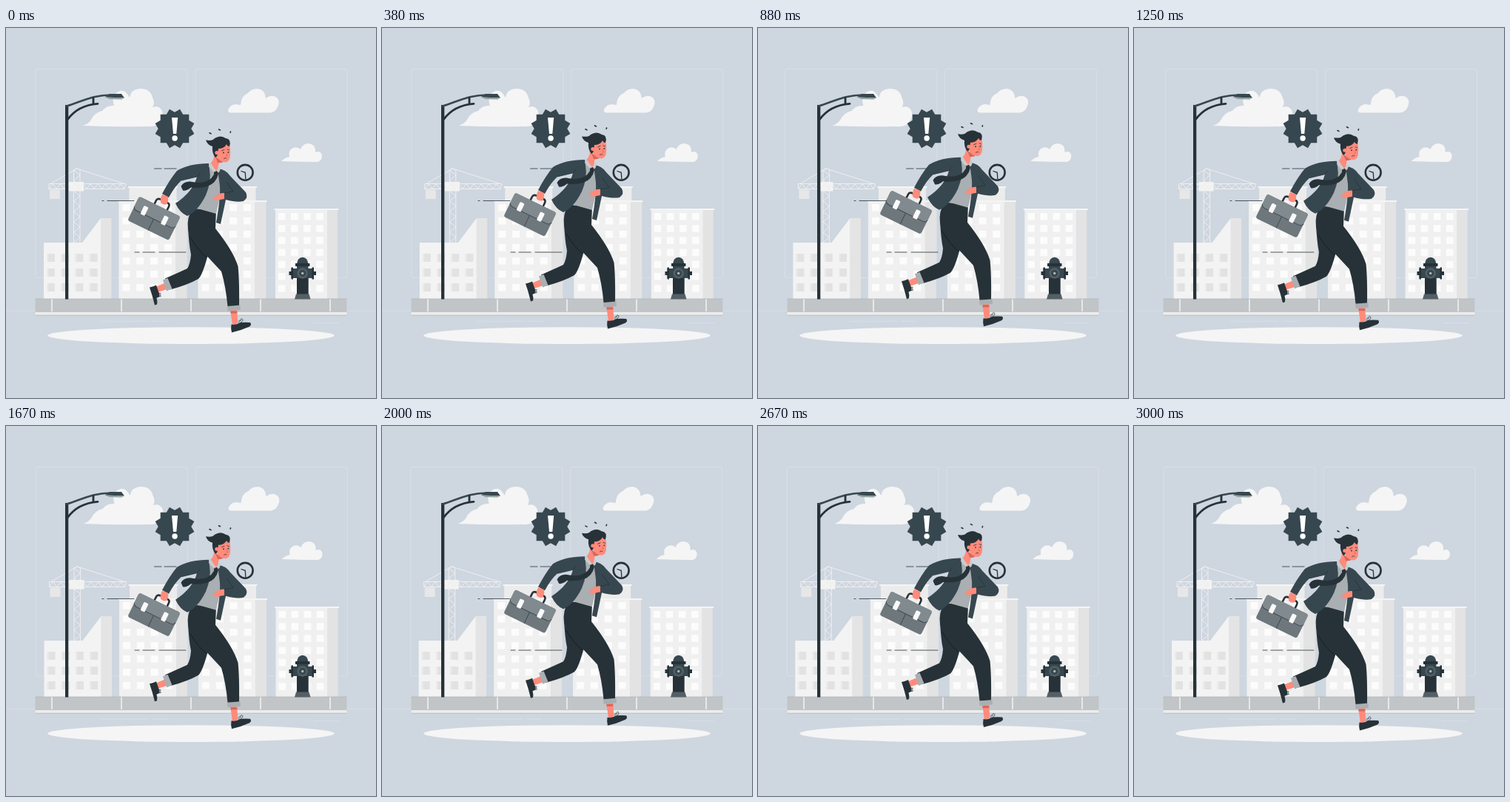
These frames come from a looping animation (500 px wide and 500 px high, 3.04 s). An HTML page:

```html
<!DOCTYPE html>
<html lang="en">
<head>
<meta charset="utf-8">
<title>Running late</title>
<style>
  html, body { margin: 0; width: 100%; height: 100%; overflow: hidden; background: #ced6e0; }
  svg { display: block; width: 100%; height: 100%; }
  .dark { fill: #263238; }
  .coat { fill: #37474f; }
  .skin { fill: #ff8b7b; }
  .shirt { fill: #a9afb2; }
  .pale { fill: #f5f5f5; }
  .line { fill: none; stroke: #263238; stroke-linecap: round; }
</style>
</head>
<body>
<svg viewBox="0 0 500 500">
  <g id="city">
    <g fill="none" stroke="#dbe1e8" stroke-width=".8">
      <rect x="40" y="55.5" width="205" height="282" rx="3"/>
      <rect x="256" y="55.5" width="205" height="282" rx="3"/>
      <path d="M0 382.3H500M127 396.3H192M197 396.3H218M415 398.5H450"/>
    </g>
    <g class="pale">
      <path d="M104 132Q112 129 115 124Q120 114 130 112Q136 104 146 105Q142 92 150 87Q160 80 167 94Q169 83 180 82Q195 81 198 94Q202 101 198 107Q207 104 211 112Q214 121 207 128Q204 134 190 133Q145 134 104 132Z"/>
      <path d="M300 111Q303 103 311 103Q315 104 317 104Q318 91 327 88Q331 82 340 82Q350 83 351 95Q359 89 366 94Q371 99 367 107Q364 114 357 114.5H305Q300 115 300 111Z"/>
      <path d="M372 180Q377 175 383 174Q381 165 388 162Q394 160 398 164Q401 156 409 156Q419 157 418 168Q425 165 427 172Q427 180 421 181Q398 181 372 180Z"/>
    </g>
    <g id="crane" fill="none" stroke="#efefef" stroke-width="1">
      <path d="M91.5 192V290M100 192V290M58 210.5H162M58 217.5H160M162 210.5L160 217.5M58 210.5V218M95.5 190L60 210.5M95.5 190L160 210.5M91.5 192L95.5 189.5L100 192"/>
      <rect x="59" y="218.5" width="14" height="12.5" fill="#e7e7e7" stroke="none"/>
      <rect x="85" y="208" width="20" height="12.5" fill="#f3f3f3" stroke="none"/>
    </g>
    <path fill="#e4e4e4" d="M128 257H142.5V366H128Z"/>
    <path fill="#f3f3f3" d="M51 290H103L128 257V366H51Z"/>
    <g id="houses"></g>
  </g>

  <path fill="#c2c5c7" d="M39.5 366H460.5V384H39.5Z"/>
  <path fill="#ececec" d="M39.5 384H460.5V388H39.5Z"/>
  <path d="M39.5 366H460.5M39.5 388.2H460.5" stroke="#aeb3b6" stroke-width=".7"/>
  <path d="M62 366.5V383M156 366.5V383M250 366.5V383M344 366.5V383M438 366.5V383" stroke="#ececec" stroke-width="1.8"/>
  <ellipse class="pale" cx="250" cy="415.6" rx="194" ry="11.4"/>

  <!-- street lamp -->
  <path class="dark" d="M80 104H84.3V366.5H80Z"/>
  <path class="line" style="stroke:#37474f" d="M82 105.5C101 100 117 89.5 146 90.5" stroke-width="2.6"/>
  <path class="line" d="M83 124C90 114 102 104 124 102.3M118 94.5V102" stroke-width="2.8"/>
  <path class="coat" d="M134 93.5L140 89H156L160 94.5Z"/>
  <path fill="#90a09f" d="M134 93.5L160 94.5L156 96.5L140 96Z"/>

  <!-- hydrant -->
  <path class="coat" d="M393 319Q394 310 400.7 309.7Q407.5 310 408.5 319V360H393Z"/>
  <path class="dark" d="M393 338H408.5V360H393ZM391 318H410.5V322H391Z"/>
  <path class="coat" d="M385.5 325H416V338H385.5Z"/>
  <path class="dark" d="M385.5 323.5H388V339.5H385.5ZM413.5 323.5H416V339.5H413.5ZM382.5 329H385.5V334H382.5ZM416 329H419V334H416Z"/>
  <circle cx="400.7" cy="331.5" r="7.2" fill="#546066"/>
  <circle class="coat" cx="400.7" cy="331.5" r="4.7"/>
  <circle cx="400.7" cy="331.5" r="1.7" fill="#aeb7bb"/>
  <path fill="#546066" d="M392 359.5H409.5L411.5 366.5H390Z"/>

  <polygon id="badge" class="coat"/>
  <path fill="#fff" d="M224 121H232.2L230.3 143H226Z"/>
  <circle fill="#fff" cx="228.1" cy="149" r="3.7"/>

  <circle class="line" cx="323.2" cy="195.3" r="10.4" stroke-width="2.6"/>
  <path class="line" d="M318 193.5L323.3 195.3L323.8 204" stroke-width="1.3"/>

  <path class="line" stroke-width=".8" d="M200.5 190H210M214 190H230M130 233.5H132M137 233.5H173M174 303H180M185 303H201M207 303H243"/>

  <g id="man">
    <path class="line" stroke-width="1.6" d="M275 141.8L277 142.8M287.5 137L289.5 138M303.5 140L303.2 141.3"/>

    <!-- rear leg -->
    <path class="skin" d="M203 349.5L214 345L218 353L205 357Z"/>
    <path class="dark" d="M194 350.5Q199 349.5 203 347.5L206 356Q208 359 207.5 363L203.5 365Q205 370 204 373.5L201 374.5Q198 362 194 350.5Z"/>
    <path class="line" stroke-width=".7" d="M206 359Q211 357 208 361Q212 363 206 363"/>
    <path class="dark" d="M246 268Q247 292 250 306Q249 319 245 325Q232 331 215 338.5L222 353.5Q246 347 260 339Q266 333 273 306L270 275Z"/>
    <path class="shirt" d="M212 340.5L218.5 338L224.5 352.5L217 355.5Z"/>

    <!-- front leg -->
    <path class="skin" d="M303 380L312 380L313.5 399L306 402Z"/>
    <path d="M303.5 384H312.3" stroke="#d8665d" stroke-width="3"/>
    <path class="dark" d="M304.5 400.5Q310 402 317 398Q324 397.5 330 398Q332.500 401 329 403.500Q317 409 305 411.500Q303.500 406 304.500 400.500Z"/>
    <path class="line" stroke-width=".7" d="M315 399Q314 393 317 396Q317 391 320 394Q321 396 317 398"/>
    <path class="dark" d="M252 244Q244 256 246 272Q248 284 256 293Q275 311 291 329Q297 349 299.500 376H315Q315.500 341 313.500 322Q307 301 283 271L284 246Z"/>
    <path d="M249 283Q259 300 271 310" fill="none" stroke="#151e23" stroke-width="1"/>
    <path class="shirt" d="M299 376L316.500 374.500L317 381L299.500 382.500Z"/>

    <!-- torso -->
    <path class="shirt" d="M275 183L289 190L292 215L284 251L259 244Z"/>
    <path class="coat" d="M286 190Q297 191 303 200L324 222Q328 229 321 234Q312 236 297 232L290 265L284 263Q290 229 289 214Z"/>
    <path d="M298 208L307 221L295 223" fill="none" stroke="#263238" stroke-width=".8"/>
    <path class="skin" d="M295 223Q287 222 280 230Q281 234 287 232.500L295 231Z"/>
    <path class="coat" d="M274 183Q247 183 231 193Q221 205 211 224L220 229Q228 214 237 206L258 201Q253 221 229 237Q235 250 245 254Q259 248 270 226Q278 207 275 191Z"/>
    <path d="M237 206L258 201L262 196" fill="none" stroke="#263238" stroke-width=".8"/>

    <!-- head -->
    <path class="skin" d="M281 171Q281 179 276 183Q279 190 285 194Q287 187 288 181Z"/>
    <path fill="#d8665d" d="M283 174L294 181Q289 183 286 182Z"/>
    <path class="skin" d="M284 161L301 154Q304 164 303 172Q303 180 297 181.500Q288 181 284 172Z"/>
    <path class="dark" d="M270 151.500Q279 153 282 149Q290 144 297 149Q305 150 302 160Q299 160 298 157Q295 163 287 163L286 170Q285 175 283 175Q278 169 279 160Q272 158 270 151.500Z"/>
    <circle class="skin" cx="284.800" cy="168.500" r="2.500"/>
    <circle class="dark" cx="294" cy="168.500" r=".9"/>
    <circle class="dark" cx="300.300" cy="168" r=".9"/>
    <path class="line" stroke-width=".8" d="M291.500 166L295 164.500M299 164L301.500 165M294.500 176.500Q296.500 174.800 298 176"/>
    <path d="M298 169L299.500 173H297.500" fill="none" stroke="#d8665d" stroke-width=".8"/>
    <path fill="#c8cdd0" d="M276 181L274 187L280 194L284 193Q279 187 276 181ZM288 186L284 194L288 195L290 190Z"/>
    <path class="dark" d="M281 195L285 193L287 197Q284 210 272 214Q262 217 250 215.500Q243 221 239 219.500L236.500 214Q240 207 249 207.500Q273 213 281 198Z"/>

    <!-- briefcase -->
    <g transform="translate(200 257.300) rotate(26)">
      <path class="line" stroke-width="2.600" d="M-8 -17V-23Q-8 -27 -3 -27H7Q11 -27 11 -23V-17"/>
      <rect x="-31" y="-18" width="62" height="36" rx="3" fill="#6d777c"/>
      <path fill="#818a8f" d="M-28 -18H28Q31 -18 31 -14V-3Q30 1 25 1H-25Q-30 1 -31 -3V-14Q-31 -18 -28 -18Z"/>
      <path d="M-31 -3Q-30 1 -25 1H25Q30 1 31 -3M0 1V18" fill="none" stroke="#3d484e" stroke-width=".9"/>
      <rect x="-19.500" y="-10" width="6.500" height="12.500" rx="1.500" fill="#fafafa"/>
      <rect x="11" y="-10" width="6.500" height="12.500" rx="1.500" fill="#fafafa"/>
    </g>
    <path class="skin" d="M211 225L219 228Q220 235 217 238Q213 240 209 236Q208 230 211 225Z"/>
  </g>
</svg>
<script>
const $ = id => document.getElementById(id);
const box = (x, y, w, h, fill) => `<rect x="${x}" y="${y}" width="${w}" height="${h}" fill="${fill}"/>`;

function windows(x, y, cols, rows, dx, dy, w, h, fill) {
  let out = '';
  for (let r = 0; r < rows; r++)
    for (let c = 0; c < cols; c++) out += box(x + c * dx, y + r * dy, w, h, fill);
  return out;
}

function tower(x) {
  return box(x + 14, 215, 64, 20, '#ececec') + box(x + 12.5, 214, 67, 2, '#f5f5f5') +
    box(x, 234, 77, 132, '#f0f0f0') + box(x + 77, 234, 15, 132, '#e3e3e3') +
    box(x - 1, 233, 94, 2, '#f5f5f5') +
    windows(x + 5, 238, 4, 7, 18.8, 18, 10, 9.5, '#fcfcfc');
}

$('houses').innerHTML =
  windows(55, 305, 4, 3, 19.2, 20, 11, 11, '#e2e2e2') +
  windows(55, 305, 4, 3, 19.2, 20, 2, 11, '#ebebeb') +
  tower(152.5) + tower(259.5) +
  box(364, 245, 70, 121, '#f0f0f0') + box(434, 245, 14, 121, '#e3e3e3') +
  box(362.5, 244, 87, 2, '#f5f5f5') +
  windows(368, 250, 4, 7, 17.1, 16.2, 9.5, 9.5, '#fcfcfc');

// Crane lattice: zigzags along the jib and up the mast
let lattice = 'M58 217.5';
for (let i = 1; i <= 20; i++) lattice += `L${58 + i * 5.1} ${i % 2 ? 210.5 : 217.5}`;
lattice += 'M91.500 192';
for (let i = 1; i <= 14; i++) lattice += `L${i % 2 ? 100 : 91.5} ${192 + i * 7}`;
$('crane').insertAdjacentHTML('beforeend', `<path d="${lattice}"/>`);

$('badge').setAttribute('points', Array.from({ length: 24 }, (_, i) => {
  const a = i * Math.PI / 12, r = i % 2 ? 27.3 : 22.3;
  return [228 + r * Math.cos(a), 136 + r * Math.sin(a)];
}).join(' '));

const LOOP = 3040, RUN = 3000, STRIDE = 1500;
const shake = [0, -1, 2, -4, 4, -4, 4, -4, 2, -1, 0];
const start = performance.now();

function draw(now) {
  const t = Math.min(Math.max(0, now - start) % LOOP, RUN);
  const p = t / RUN * 10, i = Math.min(9, Math.floor(p));
  const x = shake[i] + (shake[i + 1] - shake[i]) * (p - i);
  const phase = t % STRIDE / STRIDE;
  const y = -10 * (1 - Math.abs(1 - 2 * phase));
  $('city').setAttribute('transform', `translate(${x} 0)`);
  $('man').setAttribute('transform', `translate(0 ${y})`);
  requestAnimationFrame(draw);
}
draw(start);
</script>
</body>
</html>
```
